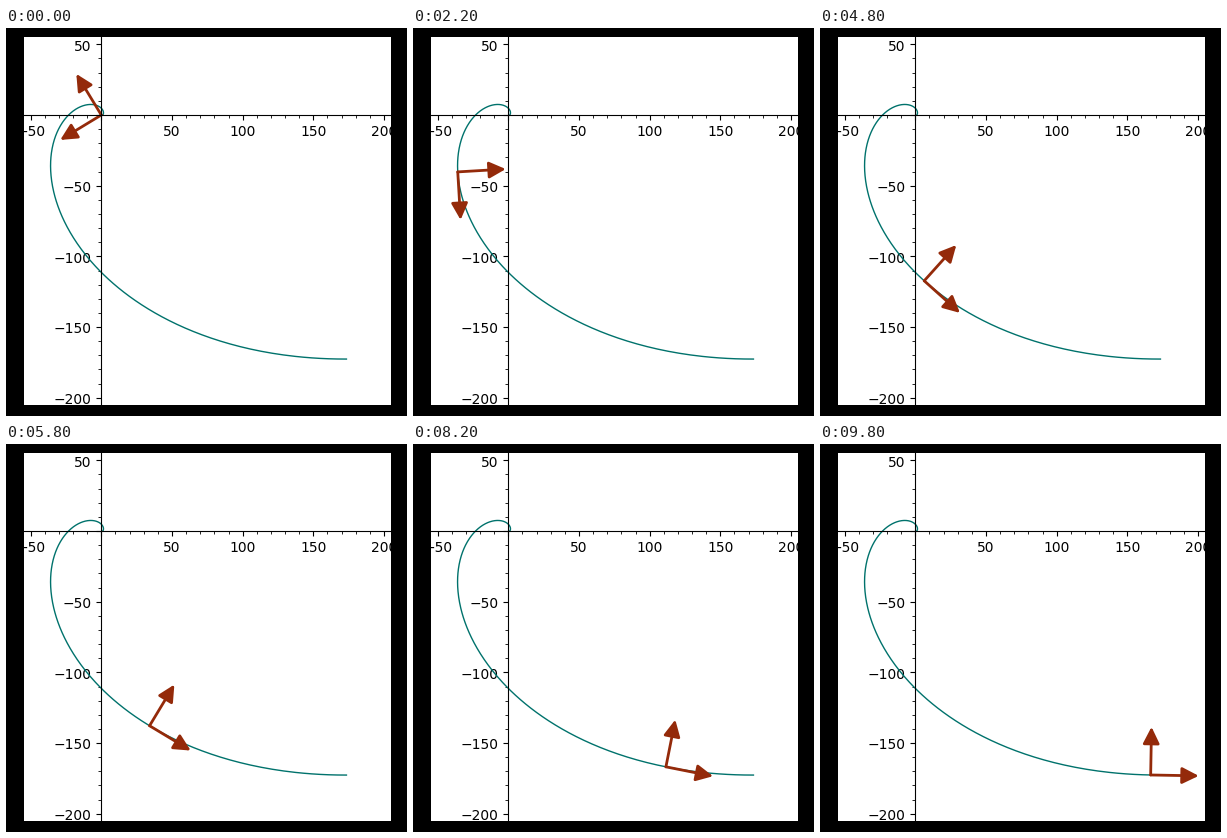
Write a matplotlib script that moves like this. It is 401x388 px and loops after 10000 ms.

```python
import numpy as np
import matplotlib.pyplot as plt
from matplotlib.animation import FuncAnimation
from matplotlib.patches import FancyArrowPatch
from matplotlib.ticker import FuncFormatter, MultipleLocator
from matplotlib.transforms import ScaledTranslation

W, H, DPI = 401, 388, 100
LEFT, RIGHT, TOP, BOTTOM = 18, 385, 9, 377   # plot area in pixels
X0, Y0, SCALE = 95.3, 87.0, 1.4137           # origin and pixels per unit
FRAMES, INTERVAL = 50, 200
TEAL, RUST = "#00726c", "#942a0a"

END = 5.5
LENGTH = np.sqrt(2) * np.exp(END)            # arc length of the spiral r = e^t
ARROW = 34

plt.rcParams["font.family"] = "DejaVu Sans"
fig = plt.figure(figsize=((W + 1e-6) / DPI, (H + 1e-6) / DPI), dpi=DPI,
                 facecolor="black")
ax = fig.add_axes([LEFT / W, 1 - BOTTOM / H, (RIGHT - LEFT) / W,
                   (BOTTOM - TOP) / H], facecolor="white")
ax.set_xlim((LEFT - X0) / SCALE, (RIGHT - X0) / SCALE)
ax.set_ylim((Y0 - BOTTOM) / SCALE, (Y0 - TOP) / SCALE)

for side in ("top", "right"):
    ax.spines[side].set_visible(False)
for side in ("left", "bottom"):
    ax.spines[side].set_position(("data", 0))


def tick_label(value, _):
    return f"{value:.0f}".replace("-", "\u2212") if abs(value) > 1 else ""


for axis in (ax.xaxis, ax.yaxis):
    axis.set_major_locator(MultipleLocator(50))
    axis.set_minor_locator(MultipleLocator(10))
    axis.set_major_formatter(FuncFormatter(tick_label))
ax.tick_params(labelsize=10)

# the numbers on the vertical axis sit slightly below their ticks
nudge = ScaledTranslation(0, -0.8 / DPI, fig.dpi_scale_trans)
for label in ax.get_yticklabels():
    label.set_transform(label.get_transform() + nudge)


def spiral(t):
    return np.exp(t) * np.cos(t), np.exp(t) * np.sin(t)


ax.plot(*spiral(np.linspace(0, END, 600)), color=TEAL, lw=1)


def make_arrow():
    arrow = FancyArrowPatch((0, 0), (1, 1), lw=2, color=RUST,
                            arrowstyle="-|>,head_width=5,head_length=10",
                            mutation_scale=1, shrinkA=0, shrinkB=0, zorder=2.1)
    return ax.add_patch(arrow)


tangent, normal = make_arrow(), make_arrow()


def update(i):
    # constant speed along the curve, starting just off the centre
    s = 0.01 + (LENGTH - 0.01) * i / FRAMES
    t = np.log(s / np.sqrt(2))
    x, y = spiral(t)
    for arrow, turn in ((tangent, np.pi / 4), (normal, 3 * np.pi / 4)):
        tip = (x + ARROW * np.cos(t + turn), y + ARROW * np.sin(t + turn))
        arrow.set_positions((x, y), tip)
    return tangent, normal


anim = FuncAnimation(fig, update, frames=FRAMES, interval=INTERVAL,
                     repeat=True, repeat_delay=0)
plt.show()
```
